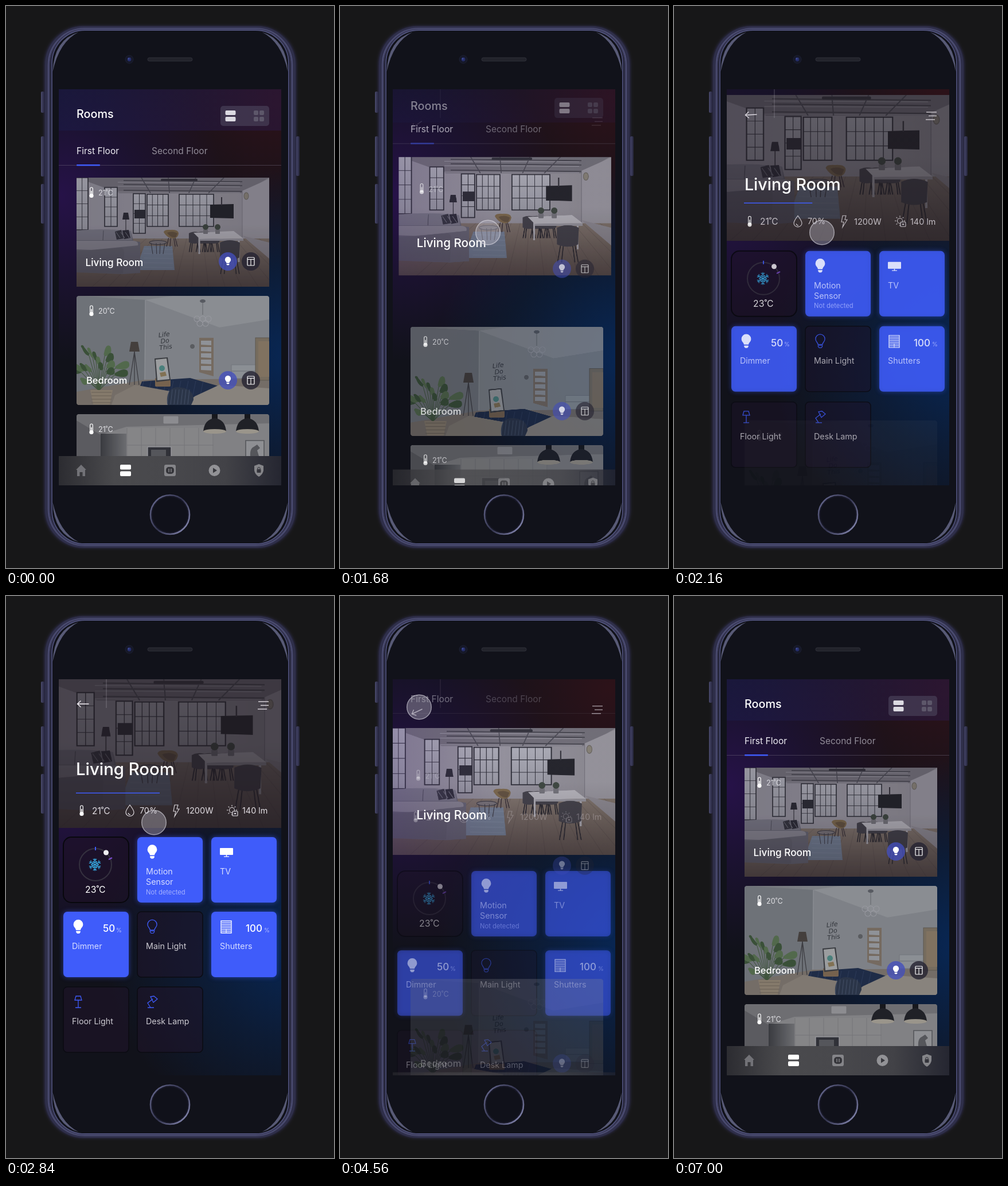
Write an HTML page with a canvas that moves like this. It is 572x979 px and loops after 7040 ms.

```html
<!DOCTYPE html>
<html lang="en">
<head>
<meta charset="utf-8">
<title>Smart home rooms</title>
<style>
html, body { margin: 0; width: 100%; height: 100%; overflow: hidden; background: #171718; }
canvas { display: block; }
</style>
</head>
<body>
<canvas id="stage" width="572" height="979"></canvas>
<script>
const LOOP = 7040, BLUE = '#3f5cfa', DARK = '#2b2d36';
const stage = document.getElementById('stage').getContext('2d');
let c = stage;

// ---------- drawing helpers ----------
const clamp = v => Math.max(0, Math.min(1, v));
const mix = (a, b, k) => a + (b - a) * k;
const smooth = v => { v = clamp(v); return v * v * (3 - 2 * v); };

function paint(fill, stroke, lw = 1, path) {
  const args = path ? [path] : [];
  if (fill) { c.fillStyle = fill; c.fill(...args); }
  if (stroke) { c.strokeStyle = stroke; c.lineWidth = lw; c.stroke(...args); }
}
function box(x, y, w, h, r, fill, stroke, lw) {
  c.beginPath(); c.roundRect(x, y, w, h, r); paint(fill, stroke, lw);
}
function circ(x, y, r, fill, stroke, lw) {
  c.beginPath(); c.arc(x, y, r, 0, 7); paint(fill, stroke, lw);
}
function oval(x, y, rx, ry, fill, stroke, lw) {
  c.beginPath(); c.ellipse(x, y, rx, ry, 0, 0, 7); paint(fill, stroke, lw);
}
function trace(p) {
  c.beginPath();
  for (let i = 0; i < p.length; i += 2) c.lineTo(p[i], p[i + 1]);
}
function poly(fill, ...p) { trace(p); paint(fill); }
function line(color, lw, ...p) { trace(p); paint(null, color, lw); }
function path(d, fill, stroke, lw) { paint(fill, stroke, lw, new Path2D(d)); }
function text(s, x, yMid, size, color = '#fff', weight = 400) {
  c.font = `${weight} ${size}px Inter, Roboto, sans-serif`;
  c.fillStyle = color;
  c.fillText(s, x, yMid + size * .364);
}
function grad(x0, y0, x1, y1, ...colors) {
  const g = c.createLinearGradient(x0, y0, x1, y1);
  colors.forEach((k, i) => g.addColorStop(i / (colors.length - 1), k));
  return g;
}
function glow(x, y, r, rgb, a) {
  const g = c.createRadialGradient(x, y, 0, x, y, r);
  g.addColorStop(0, `rgba(${rgb},${a})`);
  g.addColorStop(.5, `rgba(${rgb},${a * .45})`);
  g.addColorStop(1, `rgba(${rgb},0)`);
  c.fillStyle = g;
  c.fillRect(92, 145, 388, 690);
}
function group(alpha, dx, dy, draw) {
  if (alpha <= 0) return;
  c.save();
  c.globalAlpha = clamp(alpha);
  c.translate(dx, dy);
  draw();
  c.restore();
}
function layer(x, y, w, h, scale, draw) {
  const cv = document.createElement('canvas');
  cv.width = w * scale; cv.height = h * scale;
  const keep = c;
  c = cv.getContext('2d');
  c.scale(scale, scale);
  c.translate(-x, -y);
  draw();
  c = keep;
  return cv;
}

// ---------- icons ----------
function bulb(x, y, s, fill, stroke) {
  c.save(); c.translate(x, y); c.scale(s, s);
  path('M-2.6 4.2C-2.6 2 -5.4 1 -5.4 -2.2A5.4 5.4 0 0 1 5.4 -2.2C5.4 1 2.6 2 2.6 4.2Z', fill, stroke, .9);
  path('M-2.4 5.2H2.4V6.6L1.2 8H-1.2L-2.4 6.6Z', fill, stroke, .8);
  c.restore();
}
function thermo(x, y) {
  box(x - 2.3, y - 9, 4.6, 14, 2.3, null, '#fff', 1.2);
  circ(x, y + 5.5, 3.6, '#fff');
  line('#fff', 1.6, x, y - 3, x, y + 5);
}
function pane(x, y) {
  box(x - 6, y - 7, 12, 14, 1, null, '#fff', 1.2);
  line('#fff', 1.1, x - 6, y - 3.5, x + 6, y - 3.5);
  line('#fff', 1.1, x, y - 3.5, x, y + 7);
}
function badges(y) {
  circ(387, y, 16, 'rgba(66,78,188,.78)');
  bulb(387, y - 1, .95, '#fff');
  circ(427, y, 16, 'rgba(38,35,50,.82)');
  pane(427, y);
}
function bars(x, y, w, h, gap, fill) {
  box(x - w / 2, y - gap / 2 - h, w, h, 2, fill);
  box(x - w / 2, y + gap / 2, w, h, 2, fill);
}

// ---------- rooms ----------
function windowFrame(x, y, w, h, cols, rows) {
  box(x, y, w, h, 0, grad(0, y, 0, y + h, '#b3b5bf', '#9c9ea8'), DARK, 1.6);
  for (let i = 1; i < cols; i++) line(DARK, .9, x + w * i / cols, y, x + w * i / cols, y + h);
  for (let i = 1; i < rows; i++) line(DARK, .8, x, y + h * i / rows, x + w, y + h * i / rows);
}
function diningChair(x, y, s) {
  for (const k of [-15, -9, 11, 16]) line('#2a2a30', 1.5, x + k * s * .6, y + 20 * s, x + k * s, y + 55 * s);
  path(`M${x - 16 * s} ${y + 3 * s}Q${x} ${y - 5 * s} ${x + 17 * s} ${y + 3 * s}L${x + 16 * s} ${y + 28 * s}Q${x} ${y + 35 * s} ${x - 16 * s} ${y + 28 * s}Z`, '#43434b');
}
function livingRoom() {
  box(123, 299, 336, 190, 0, grad(123, 0, 459, 0, '#94939f', '#9a99a3', '#8e8d95'));
  poly('#74737d', 123, 299, 459, 299, 412, 326, 198, 326);
  for (const y of [304, 311, 321]) {
    line('#45464f', 1.4, 205, y, 412, y + 2);
    line('#9a9aa4', 1, 195, y + 3, 408, y + 4);
  }
  for (const x of [236, 283, 331, 380]) line('#4c4d57', 1.5, x, 299, 290 + (x - 290) * .7, 326);
  box(270, 301, 64, 4, 2, '#34353e');
  poly('#9b9aa3', 412, 322, 459, 301, 459, 438, 412, 405);
  line('#777681', 1, 412, 322, 412, 405);
  box(123, 405, 336, 84, 0, grad(0, 405, 0, 489, '#83786f', '#61554f'));
  for (let i = 0; i < 15; i++) line('rgba(35,29,31,.13)', 1, 245 + i * 14, 405, 150 + i * 29, 489);
  poly('#918f97', 412, 400, 459, 412, 459, 440);
  windowFrame(112, 299, 31, 91, 3, 4);
  windowFrame(172, 316, 22, 68, 2, 4);
  windowFrame(222, 327, 21, 69, 2, 4);
  windowFrame(246, 328, 37, 56, 4, 3);
  windowFrame(302, 328, 60, 56, 5, 3);
  box(224, 355, 19, 15, 0, DARK);
  poly('#22242b', 356, 346, 397, 345, 397, 370, 356, 369);
  line('#34353d', 2, 376, 333, 376, 347);
  oval(419, 331, 4, 6, '#8a867b', '#6b6964', 1);
  line('#35363e', 1.2, 209, 372, 209, 396);
  poly('#292b34', 205, 360, 213, 360, 215, 372, 203, 372);
  poly('#78879c', 241, 418, 290, 418, 294, 460, 226, 460);
  for (let i = 0; i < 5; i++) line('rgba(150,165,185,.2)', 2, 240, 423 + i * 8, 291, 424 + i * 8);
  // sofa
  path('M123 391Q174 387 218 392L222 409L234 411L234 465L204 467L123 464Z', '#6a6b78');
  path('M123 391Q174 387 218 392L220 408H123Z', '#7c7d8a');
  path('M123 409L222 409Q232 410 230 417L150 425L123 424Z', '#8d8d98');
  path('M123 427L199 421Q206 421 206 431L204 466L123 464Z', '#656672');
  line('#50525e', 1, 170, 391, 169, 408);
  poly('#343641', 190, 393, 201, 390, 205, 405, 193, 407);
  poly('#2b2d38', 203, 391, 214, 390, 217, 404, 206, 406);
  for (let i = 0; i < 3; i++) line('#737580', 1, 192 + i * 8, 394, 199 + i * 8, 404);
  // coffee table and armchair
  oval(265, 412, 15, 3.5, 'rgba(125,125,135,.7)', '#3c3d45', 1);
  for (const x of [253, 262, 269, 277]) line('#3c3d45', 1, x, 413, x + (265 - x) * .25, 432);
  for (const x of [280, 286, 295, 299]) line('#373036', 1.2, 289 + (x - 289) * .6, 404, x, 419);
  path('M275 394Q276 389 287 390Q300 389 301 396Q300 405 290 405Q281 404 275 394Z', '#806d4e');
  path('M281 395Q290 391 299 396L296 403Q287 404 281 395Z', '#655541');
  // dining set
  for (const x of [329, 341, 352, 362]) diningChair(x, 394, .63);
  line('#b5b5bc', 3, 337, 403, 337, 432);
  line('#b5b5bc', 3, 406, 407, 406, 446);
  poly('#bcbcc3', 327, 395, 397, 392, 414, 405, 338, 406);
  poly('#9b9ba3', 338, 406, 414, 405, 414, 409, 338, 409);
  for (const x of [348, 369]) {
    box(x - 4, 389, 8, 8, 1, '#77787f');
    circ(x, 385, 5, '#3e4a42');
  }
  diningChair(390, 409, 1.05);
  box(123, 299, 336, 190, 0, grad(0, 380, 0, 489, 'rgba(24,20,30,0)', 'rgba(24,20,30,.3)'));
}
function bedroom() {
  box(123, 505, 336, 190, 4, grad(123, 0, 459, 0, '#73767b', '#82858a', '#74787d'));
  c.clip();
  poly('#8a8d92', 243, 512, 290, 505, 459, 505, 459, 550, 372, 560);
  poly('#7e8187', 243, 512, 372, 560, 459, 546, 459, 660, 243, 655);
  poly('#6e7278', 123, 505, 243, 512, 241, 655, 123, 690);
  line('#909398', 1, 243, 512, 242, 655);
  poly('#746d67', 123, 672, 242, 651, 459, 649, 459, 695, 123, 695);
  line('#62656b', 1, 343, 516, 343, 538);
  oval(343, 514, 5, 3, '#575a61');
  for (let i = 0; i < 5; i++) circ(333 + i * 5, 545 + i % 2 * 8, 5, null, '#9a9ba2', .8);
  c.save();
  c.translate(277, 583); c.rotate(-.13);
  c.textAlign = 'center';
  c.fillStyle = '#33363c';
  c.font = 'italic 500 11px "DejaVu Sans", cursive, sans-serif';
  ['Life', 'Do', 'This'].forEach((s, i) => c.fillText(s, 0, -7 + i * 11));
  c.restore();
  circ(325, 593, 4, '#5a5c60');
  poly('#756a60', 337, 578, 362, 578, 362, 645, 337, 638);
  for (let i = 0; i < 5; i++) poly('#8f9298', 340, 583 + i * 11, 358, 583 + i * 11, 358, 591 + i * 11, 340, 590 + i * 11);
  // floor lamp
  for (const x of [215, 224, 232]) line('#3d3d42', 1.3, 224, 602, x, 660);
  poly('#443f3d', 218, 585, 230, 585, 233, 602, 215, 602);
  // rug, stool and picture
  poly('#1f2c47', 237, 654, 321, 648, 374, 663, 347, 683, 229, 674);
  for (let i = 0; i < 9; i++) line('rgba(90,110,150,.22)', 1, 240 + i * 13, 653, 235 + i * 13, 677);
  box(260, 648, 27, 15, 2, '#76624e');
  poly('#3a3c41', 259, 614, 282, 612, 287, 652, 262, 655);
  poly('#9b9d9f', 261, 616, 280, 614, 285, 650, 264, 652);
  circ(272, 631, 5, '#4a807c');
  poly('#817153', 268, 639, 278, 637, 280, 644, 270, 646);
  // furniture on the right
  box(393, 625, 43, 24, 1, '#8b8f94', '#72767c', 1);
  line('#6c7076', 1, 393, 636, 436, 636);
  box(435, 578, 24, 74, 0, '#766c5e', '#5c5750', 1);
  box(440, 584, 19, 62, 0, '#807260');
  poly('#7f7871', 190, 678, 225, 660, 286, 671, 295, 695, 184, 695);
  poly('#88837d', 329, 680, 372, 660, 459, 666, 459, 695, 314, 695);
  path('M281 692Q279 665 299 664Q327 665 327 686L323 695H282Z', '#2b3548');
  for (let i = 0; i < 7; i++) line('rgba(115,130,160,.35)', 1, 284 + i * 6, 668, 281 + i * 6, 694);
  // plant
  for (let i = 0; i < 16; i++) {
    const a = -2.85 + i * .165, r = 32 + i * 29 % 37, x = 160 + Math.cos(a) * r * .9, y = 662 + Math.sin(a) * r * 1.15;
    const mx = mix(160, x, .6), my = mix(662, y, .8);
    line('#40553d', 1, 162, 670, mx, my);
    path(`M${mx} ${my}Q${x - 5} ${y - 5} ${x} ${y}Q${x + 4} ${y + 12} ${mx} ${my}`, i % 2 ? '#3a5038' : '#52694c', i % 2 ? '#3a5038' : '#52694c', 4);
  }
  poly('#857a6b', 147, 669, 186, 669, 181, 694, 152, 694);
  for (let i = 0; i < 4; i++) line('#685f55', 1, 149, 673 + i * 6, 184, 673 + i * 6);
}
function kitchen() {
  box(123, 711, 336, 190, 4, '#818184');
  c.clip();
  poly('#6e6e72', 123, 711, 459, 711, 459, 727, 210, 733, 165, 747, 123, 722);
  poly('#5b5b60', 123, 722, 165, 747, 165, 835, 123, 835);
  box(165, 745, 45, 90, 0, grad(165, 0, 210, 0, '#3a3b40', '#6c6d71'));
  box(211, 735, 151, 100, 0, '#858587');
  for (let x = 211; x < 365; x += 25) line('#727276', .8, x, 735, x, 835);
  line('#707074', .8, 211, 765, 362, 765);
  box(274, 714, 27, 14, 2, '#8c8c90', '#6c6c70', 1);
  box(247, 768, 41, 30, 1, '#303138', '#99999e', 1.3);
  box(253, 773, 26, 20, 0, '#55565b');
  box(418, 757, 32, 40, 0, '#8e8f93', '#55565b', 1.6);
  path('M426 784Q425 771 432 768L438 764L443 770L438 774L441 784Z', '#55565b');
  for (const x of [364, 421]) {
    box(x - 5, 711, 10, 10, 0, '#17181d');
    path(`M${x - 20} 741Q${x - 18} 720 ${x} 718Q${x + 18} 720 ${x + 20} 741Z`, '#202127');
    oval(x, 741, 20, 4, '#9a958b');
  }
}

// ---------- fixed scenery ----------
function shell(x, y, r, fill, stroke, lw) {
  box(x, y, 573 - 2 * x, 979 - 2 * y, r, fill, stroke, lw);
}
function phone() {
  box(0, 0, 572, 979, 0, '#171718');
  for (const [x, y, h] of [[61, 149, 37], [61, 227, 70], [61, 310, 69], [506, 227, 69]])
    box(x, y, 6, h, 2, grad(x, 0, x + 6, 0, '#4b4c70', '#242439'));
  c.shadowColor = '#302e50'; c.shadowBlur = 5;
  shell(67, 35, 68, '#25253a');
  c.shadowBlur = 0;
  shell(70, 37, 66, null, '#2f2f4a', 4);
  shell(74, 39.5, 63, null, '#4a4b70', 3);
  shell(76.5, 41, 61, '#1d1d2e', '#34344f', 2);
  shell(80, 42, 58, '#11121a', '#4f517a', 1.8);
  // soft reflections in the four glass corners
  for (const sx of [1, -1]) for (const sy of [1, -1]) {
    c.save();
    c.translate(286.5, 489.5); c.scale(sx, sy);
    path('M-205 -375Q-203 -431 -160 -444Q-194 -427 -205 -375Z', 'rgba(135,138,180,.6)');
    c.restore();
  }
  circ(215, 93, 7, '#161827', '#1d2033', 1);
  circ(215, 93, 3.4, '#252e69');
  circ(214, 92, 1.4, '#414b95');
  box(247, 90, 78, 6, 3, '#22232b', '#2f3039', 1);
  circ(286, 886, 34, '#10111a', grad(254, 860, 318, 910, '#65678d', '#33344e', '#8587b0'), 2.6);
  circ(286, 886, 31.5, null, '#1d1d30', 1);
}
function wallpaper() {
  box(92, 145, 388, 690, 0, '#11121a');
  glow(470, 160, 300, '66,18,24', .56);
  glow(92, 330, 290, '58,18,115', .52);
  glow(500, 610, 330, '3,50,116', .66);
}
const scenery = layer(0, 0, 572, 979, 1, () => { phone(); wallpaper(); });
const livingImg = layer(123, 299, 336, 190, 2, livingRoom);
const bedImg = layer(123, 505, 336, 190, 2, bedroom);
const kitchenImg = layer(123, 711, 336, 124, 2, kitchen);

// ---------- list screen ----------
function header() {
  box(92, 145, 388, 72, 0, grad(92, 0, 480, 0, 'rgba(27,27,70,.62)', 'rgba(43,24,62,.62)'));
  text('Rooms', 123, 188, 19.8, '#fff', 500);
  box(374, 174, 85, 35, 5, 'rgba(77,71,94,.6)');
  bars(391.5, 191.5, 18, 8, 3, '#dcdae2');
  for (const x of [436, 446]) bars(x, 191.5, 8, 8, 3, '#5d576a');
}
function tabs() {
  text('First Floor', 123, 252, 15.6, '#eeedf3');
  text('Second Floor', 254, 252, 15.5, '#918c98');
  line('rgba(120,112,132,.42)', 1, 92, 277.5, 480, 277.5);
}
function card(img, y, h, temp, name) {
  c.drawImage(img, 123, y, 336, h);
  thermo(149, y + 26);
  text(temp, 161, y + 26.5, 12.6, '#e1e1e5');
  if (name) {
    text(name, 140, y + 147, 16.5, '#fff', 500);
    badges(y + 147);
  }
}
function nav() {
  box(92, 784, 388, 51, 0, grad(92, 0, 480, 0, '#2c2c31', '#4a4a4d', '#48484c', '#424247', '#252631'));
  const g = '#858589';
  path('M122 808L131 799L140 808H138V819H133.5V812H128.5V819H124V808Z', '#727277');
  bars(208.5, 809, 19, 8.5, 3, '#fff');
  box(276, 799, 20, 20, 3, g);
  box(279, 803, 14, 12, 5, '#36363b');
  line(g, 1.5, 284, 806, 284, 812);
  line(g, 1.5, 288, 806, 288, 812);
  circ(363.5, 809, 10, '#929296');
  poly('#38383d', 361, 804.5, 368, 809, 361, 813.5);
  path('M441 798L449 801V809Q448 816 441 820Q434 816 433 809V801Z', g);
  box(437.5, 807, 7, 6, 1, '#34343b');
  path('M439 807V805Q441 802 443 805V807', null, '#34343b', 1.2);
}

// ---------- detail screen ----------
function stats() {
  const ink = '#e0dce1';
  thermo(132, 374);
  text('21˚C', 150, 374, 15.4, ink);
  path('M216 364Q209 373 209 377A7 6.5 0 0 0 223 377Q223 373 216 364ZM213 378Q214 381 217 381', null, ink, 1.2);
  text('70%', 233, 374, 14.3, ink);
  path('M294 364H300L298 371H302L294 384L296 375H292Z', null, ink, 1.1);
  text('1200W', 314, 374, 14.6, ink);
  circ(394, 373, 4.5, null, ink, 1.1);
  for (let i = 0; i < 8; i++) {
    const x = Math.cos(i * Math.PI / 4), y = Math.sin(i * Math.PI / 4);
    line(ink, 1.1, 394 + x * 6.5, 373 + y * 6.5, 394 + x * 9, 373 + y * 9);
  }
  box(395, 375, 9, 8, 1, '#393239', ink, 1.1);
  box(398, 378, 3, 2, 0, ink);
  text('140 lm', 412, 374, 14.4, ink);
}
function tile(x, y, on, label, extra) {
  c.save();
  if (on) { c.shadowColor = 'rgba(63,92,250,.55)'; c.shadowBlur = 9; }
  box(x, y, 114, 114, 7, on ? BLUE : 'rgba(31,20,43,.55)', on ? null : '#0b0b12', 1.5);
  c.restore();
  if (label) text(label, x + 15, y + 60, 14.3, on ? '#d6dcff' : '#cbc9d0');
  if (extra) {
    const w = extra.length > 2 ? 60 : 69;
    text(extra, x + w, y + 29, 17, '#fff', 500);
    text('%', x + 92, y + 32, 10, '#b9c3ff');
  }
}
function climate() {
  box(100, 420, 114, 114, 14, 'rgba(29,18,38,.6)', '#08080d', 2);
  circ(156, 468, 28, null, '#35313f', 2);
  line(BLUE, 2, 156, 437, 156, 443);
  line('#7c4bd0', 2, 179, 459, 185, 456);
  circ(174.5, 447, 4.5, '#f0eef3');
  for (let i = 0; i < 6; i++) {
    c.save();
    c.translate(155, 468); c.rotate(i * Math.PI / 3);
    path('M0 0V-11M-3 -10L0 -7L3 -10M-3 -6L0 -3L3 -6', null, '#36a7df', 1.3);
    c.restore();
  }
  text('23˚C', 138, 511.5, 15.8);
}
const tileRows = [
  () => {
    climate();
    tile(229, 420, true, 'Motion');
    text('Sensor', 244, 497.5, 14.3, '#d6dcff');
    text('Not detected', 244, 515.5, 11.2, '#a4b0ff');
    bulb(255, 445, 1.55, '#fff');
    tile(358, 420, true, 'TV');
    box(373, 439, 23, 12, 1, '#fff');
    line('#fff', 1.5, 384.5, 451, 384.5, 454);
    line('#fff', 1.2, 380, 454, 389, 454);
  },
  () => {
    tile(100, 550, true, 'Dimmer', '50');
    bulb(126, 575.5, 1.55, '#fff');
    tile(229, 550, false, 'Main Light');
    bulb(255, 575.5, 1.5, null, BLUE);
    tile(358, 550, true, 'Shutters', '100');
    box(375, 566, 18, 21, 0, null, '#fff', 1.4);
    for (let y = 569; y < 586; y += 3) line('#fff', 1.3, 376, y, 392, y);
    line('#fff', 1, 384, 580, 384, 587);
  },
  () => {
    tile(100, 681, false, 'Floor Light');
    path('M122 697H130L132 704H120ZM126 704V717M121 717H131', null, BLUE, 1.3);
    tile(229, 681, false, 'Desk Lamp');
    path('M247 717H258M252 717L247 709L256 702M252 698L258 697L264 702L257 708Z', null, BLUE, 1.3);
  }
];
function hero(p, q) {
  const k = clamp(p / .35), x = mix(123, 92, k), w = mix(336, 388, k);
  const y = mix(299, 145, p), h = mix(190, 259, p), s = Math.max(w / 336, h / 190);
  c.save();
  c.beginPath(); c.rect(x, y, w, h); c.clip();
  c.drawImage(livingImg, x + w / 2 - 168 * s, y + h / 2 - 95 * s, 336 * s, 190 * s);
  const tint = Math.sin(Math.PI * clamp(p)), shade = .2 * (1 - k) + .64 * clamp((p - .55) / .45);
  box(x, y, w, h, 0, grad(x, 0, x + w, 0, `rgba(70,40,115,${.28 * tint})`, `rgba(75,50,80,${.08 * tint})`, `rgba(75,60,60,${.1 * tint})`));
  box(x, y, w, h, 0, `rgba(30,24,32,${shade})`);
  c.restore();
  group(1 - p * 1.5, -28 * p, -28 * p, () => {
    thermo(149, 325);
    text('21˚C', 161, 325.5, 12.6, '#d9d9df');
  });
  group(1 - p * 1.45, 0, 55 * p, () => badges(445));
  text('Living Room', mix(138.5, 122, q), mix(446.5, 301, p), mix(17.2, 29.3, q), '#fff', 500);
}
function detailBar(p, alpha) {
  const away = 1 - p;
  group(alpha, 134.5, 188 + 24 * away, () => {
    c.rotate(-.8 * away);
    path('M10 0H-10M-4 -5.5L-10 0L-4 5.5', null, '#eeeaf0', 1.5);
  });
  group(alpha, 0, 14 * away, () => {
    line('#ded9df', 1.4, 440, 184, 458, 184);
    line('#ded9df', 1.4, 444, 190.5, 458, 190.5);
    line('#ded9df', 1.4, 439, 197, 455, 197);
  });
  group(p * .35, 0, 0, () => line('#c8c3ce', 1, 175, 145, 175, 195));
}

function touch(x, y, t, from, to) {
  const a = Math.min(clamp((t - from) / 180), clamp((to - t) / 200));
  group(a, 0, 0, () => circ(x, y, 21.3, 'rgba(190,187,200,.38)', 'rgba(225,223,232,.6)', 1.4));
}

function draw(t) {
  const back = t > 3500;
  const p = back ? 1 - smooth((t - 4080) / 900) : smooth((t - 1400) / 900);
  const q = p ** (back ? 1.5 : .85), late = clamp((p - .65) / .35);
  const tilesIn = back ? clamp(p * 1.06) : late;
  c.drawImage(scenery, 0, 0);
  c.save();
  c.beginPath(); c.rect(92, 145, 388, 690); c.clip();

  group(1 - p * 2.3, 0, -60 * p, header);
  group(1 - p * 1.3, 0, -163 * p, tabs);
  group(1 - p * 2.3, 0, -163 * p, () => box(123, 276, 41, 2.5, 1, BLUE));
  tileRows.forEach((row, i) => group(tilesIn, 0, (107 + 15 * i) * (1 - p), row));
  group(1 - p * (back ? 1.65 : 1), 0, p * (back ? 362 : 232), () => {
    card(bedImg, 505, 190, '20˚C', 'Bedroom');
    card(kitchenImg, 711, 124, '21˚C');
  });
  group(1 - p, 0, p * 102, nav);
  hero(p, q);
  detailBar(p, back ? p * 1.45 : p * .58 + late * .42);
  group(back ? (p < .45 ? p * .67 : mix(.3, 1, (p - .45) / .55)) : late, 0, 20 * (1 - p), stats);
  if (late) box(122, 342.5, 146 * late, 1.5, 0, BLUE);
  touch(258, 394.5, t, 800, 3050);
  touch(138, 193.5, t, 3600, 5400);
  c.restore();
}

const start = performance.now();
function tick() {
  draw((performance.now() - start) % LOOP);
  requestAnimationFrame(tick);
}
tick();
</script>
</body>
</html>
```
